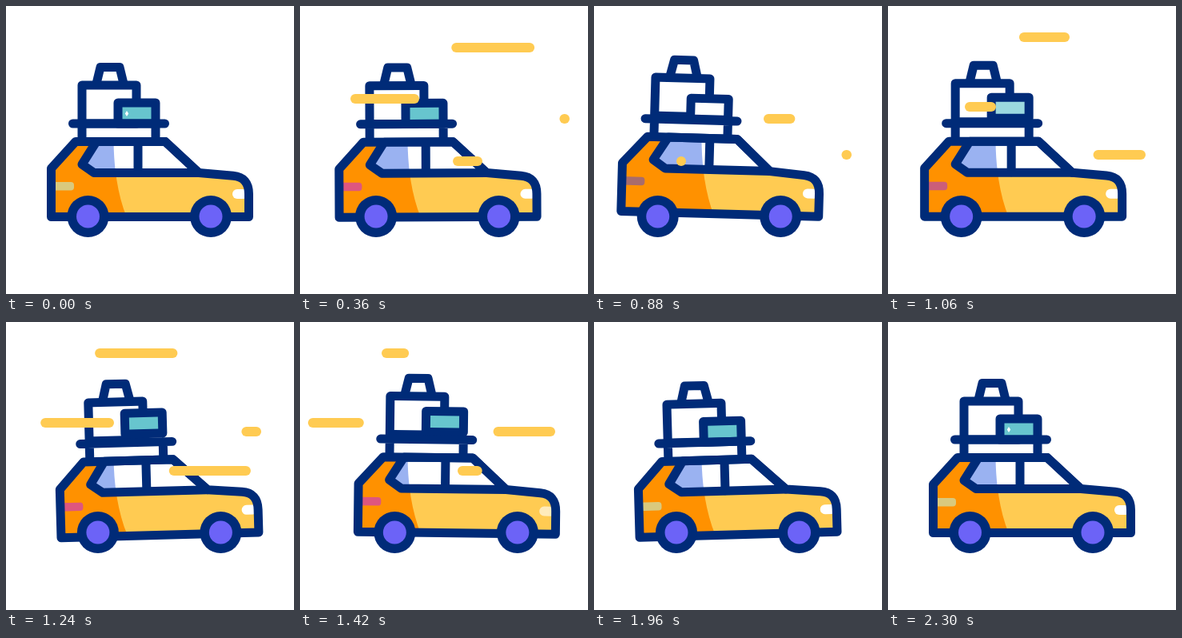
Write an HTML page with a canvas that moves like this. It is 360x360 px and loops after 2400 ms.

```html
<!DOCTYPE html>
<html lang="en">
<head>
<meta charset="utf-8">
<title>Loaded car</title>
<style>
html, body { margin: 0; width: 100%; height: 100%; overflow: hidden; background: #fff; }
canvas { display: block; width: 360px; height: 360px; }
</style>
</head>
<body>
<canvas id="stage" width="360" height="360"></canvas>
<script>
const ctx = document.getElementById('stage').getContext('2d');
const LOOP = 2400, LAST_POSE = 2300;
const NAVY = '#002b78', YELLOW = '#ffcb52', ORANGE = '#ff9100';
const WHITE = [255, 255, 255], TEAL = [103, 197, 206], AMBER = [255, 214, 118];
const KHAKI = [217, 201, 125], PINK = [222, 86, 127], BROWN = [168, 108, 108];
const PIVOT = { x: 256, y: 263 };

const body = new Path2D('M56.5 263.5V203L87 169.5H199L241 208.5L284 212.3Q303.5 214 303.5 235V263.5Z');
const glass = new Path2D('M113 169.5L95 198L110 208.5H241L199 169.5Z');
const pillar = new Path2D('M165 170V208');
const shade = new Path2D('M0 0H134.5V165C134.5 200 139 235 151.5 266V360H0Z');
const handle = new Path2D('M113 97L118 76.5H142L147 97');
const rack = new Path2D('M95 147V169M187 147V169M83.5 147H198.5');

// Speed lines: where and when each one appears.
const streaks = [
  { x: 298, y: 52, birth: 10 },
  { x: 143, y: 116, birth: 108 },
  { x: 222, y: 194, birth: 275 },
  { x: 331, y: 141, birth: 358 },
  { x: 316, y: 186, birth: 878 },
  { x: 221, y: 39, birth: 886 },
  { x: 129, y: 126, birth: 968 },
  { x: 313, y: 137, birth: 1197 }
];
const STREAK = { travel: 113, width: 12, headTime: 385, tailDelay: 325, tailTime: 260, life: 695 };

const clamp = v => Math.max(0, Math.min(1, v));
const ramp = (t, from, to) => clamp((t - from) / (to - from));
const ease = (t, from, to) => (1 - Math.cos(Math.PI * ramp(t, from, to))) / 2;
// Smooth hill of height 1 around a moment.
const bump = (t, peak, reach) => ease(t, peak - reach, peak) - ease(t, peak, peak + reach);
const mix = (a, b, p) => a.map((v, i) => v + (b[i] - v) * p);
const rgb = color => `rgb(${color.map(Math.round).join(',')})`;

function poseAt(t) {
  const rocking = Math.min(ramp(t, 0, 400), ramp(t, 2180, 1980));
  const dip = bump(t, 880, 300), surge = bump(t, 1600, 360);
  const lit = ease(t, 0, 260) - ease(t, 1700, 1940);
  return {
    drive: -22.8 * ease(t, 20, 900) + 39.3 * ease(t, 900, 1330) - 16.5 * ease(t, 1330, 2040),
    tilt: 1.6 * rocking * Math.cos(2 * Math.PI * (t - 880) / 720) + 1.35 * surge,
    bob: 1.2 * bump(t, 1500, 600) - 1.5 * dip,
    caseLift: 4 * dip + 6 * bump(t, 1500, 560),
    boxLift: 11 * bump(t, 1290, 520),
    boxFill: rgb(mix(TEAL, WHITE, dip)),
    tailLight: rgb(mix(mix(KHAKI, PINK, lit), BROWN, dip)),
    headLight: rgb(mix(WHITE, AMBER, surge)),
    glint: 1 - ease(t, 0, 200) + bump(t, 1600, 200) + ease(t, 2180, LAST_POSE)
  };
}

function fill(path, color) {
  ctx.fillStyle = color;
  ctx.fill(path);
}

function outline(path) {
  ctx.strokeStyle = NAVY;
  ctx.lineWidth = 11;
  ctx.stroke(path);
}

function pill(x, y, w, h, r, color) {
  const path = new Path2D();
  path.roundRect(x, y, w, h, r);
  fill(path, color);
}

function disc(x, y, r, color) {
  const path = new Path2D();
  path.arc(x, y, r, 0, Math.PI * 2);
  fill(path, color);
}

// The shaded side stays put on the stage while the car moves past it.
function fillShaded(path, light, dark) {
  fill(path, light);
  ctx.save();
  ctx.clip(path);
  ctx.resetTransform();
  fill(shade, dark);
  ctx.restore();
}

function crate(x, y, w, h, color) {
  const path = new Path2D();
  path.rect(x, y, w, h);
  fill(path, color);
  outline(path);
}

function drawLuggage(pose) {
  ctx.save();
  ctx.translate(0, -pose.caseLift);
  outline(handle);
  crate(95, 99, 68, 48, '#fff');
  ctx.restore();

  ctx.save();
  ctx.translate(0, -pose.boxLift);
  crate(140, 121, 47, 26, pose.boxFill);
  ctx.globalAlpha = pose.glint;
  fill(new Path2D('M151 131L153.2 134.5L151 138L148.8 134.5Z'), '#fff');
  ctx.restore();
  outline(rack);
}

function drawCar(pose) {
  ctx.save();
  ctx.translate(pose.drive, 0);

  ctx.save();
  ctx.translate(PIVOT.x, PIVOT.y + pose.bob);
  ctx.rotate(pose.tilt * Math.PI / 180);
  ctx.translate(-PIVOT.x, -PIVOT.y);
  drawLuggage(pose);
  fillShaded(body, YELLOW, ORANGE);
  fillShaded(glass, '#fff', '#9ab2f1');
  pill(52, 220, 33, 10.5, 4, pose.tailLight);
  pill(283, 229, 20, 12, 6, pose.headLight);
  [pillar, glass, body].forEach(outline);
  ctx.restore();

  for (const x of [102.5, 256]) {
    disc(x, 263, 26, NAVY);
    disc(x, 263, 14.5, '#6c63f7');
  }
  ctx.restore();
}

// The head shoots ahead, the tail catches up with it.
function drawStreak({ x, y, birth }, t) {
  const age = t - birth;
  if (age < 0 || age > STREAK.life) return;
  const { travel, width, headTime, tailDelay, tailTime } = STREAK;
  const head = x - travel * ramp(age, 0, headTime);
  const tail = x - travel * ramp(age, tailDelay, tailDelay + tailTime);
  pill(head - width / 2, y - width / 2, tail - head + width, width, width / 2, YELLOW);
}

function draw(t) {
  ctx.fillStyle = '#fff';
  ctx.fillRect(0, 0, 360, 360);
  ctx.lineCap = ctx.lineJoin = 'round';
  drawCar(poseAt(t));
  streaks.forEach(streak => drawStreak(streak, t));
}

let start;
function tick(now) {
  start ??= now;
  draw(Math.min((now - start) % LOOP, LAST_POSE));
  requestAnimationFrame(tick);
}
draw(0);
requestAnimationFrame(tick);
</script>
</body>
</html>
```
